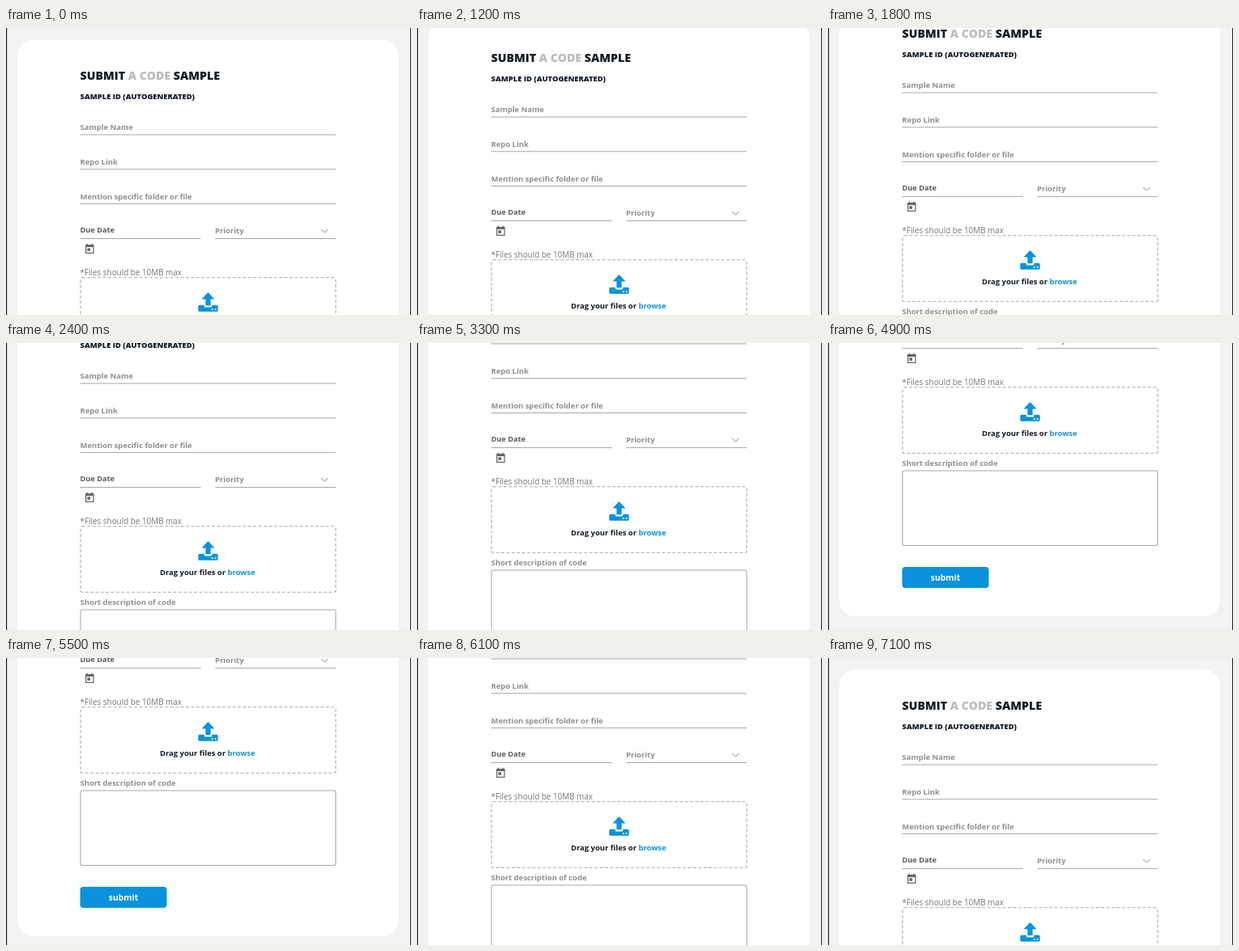
Recreate the animation shown at these times as an HTML page. Size 500x355 px, loop 7.2 s.

```html
<!DOCTYPE html>
<html lang="en">
<head>
<meta charset="utf-8">
<title>Submit a code sample</title>
<style>
  html, body { margin: 0; width: 100%; height: 100%; overflow: hidden; }
  svg { display: block; width: 500px; height: 355px; background: #f2f4f3; }
  text { font-family: "Open Sans", "Noto Sans", sans-serif; font-size: 9.45px; font-weight: 700; fill: #8f8f8f; }
  .title { font-size: 14.2px; font-weight: 800; fill: #131b24; }
  .dim { fill: #bcbcbc; }
  .sub { font-size: 9.4px; font-weight: 800; fill: #131b24; }
  .due { font-size: 9.2px; fill: #5c5c5c; }
  .note { font-size: 9.9px; font-weight: 400; fill: #777; }
  .drag { fill: #131b24; }
  .link { fill: #0b92dc; }
  .button { font-size: 10.4px; fill: #fff; }
  .line { fill: none; stroke: #a8a8a8; stroke-width: 1.05; }
  .blue { fill: #0b92dc; }
</style>
</head>
<body>
<svg viewBox="0 0 500 355">
  <g id="page">
    <rect x="14" y="14.5" width="470.3" height="577.5" rx="20" fill="#fff"/>

    <text class="title" x="91.5" y="63.5">SUBMIT <tspan class="dim">A CODE</tspan> SAMPLE</text>
    <text class="sub" x="91.5" y="88">SAMPLE ID (AUTOGENERATED)</text>

    <text x="91.5" y="126">Sample Name</text>
    <text x="91.5" y="168.7">Repo Link</text>
    <text x="91.5" y="211.5">Mention specific folder or file</text>
    <path class="line" d="M91.5 132H407M91.5 174.8H407M91.5 217.5H407"/>

    <text class="due" x="91.5" y="253.3">Due Date</text>
    <text x="258" y="254.3">Priority</text>
    <path class="line" d="M91.5 260.5H240.5M258.5 260.5H407M389 248.8l4.3 4.3 4.3-4.3"/>

    <g fill="#666">
      <path fill-rule="evenodd" d="M98 268h1.7v-1.2h1.5v1.2h4.2v-1.2h1.5v1.2h1.7v11h-10.6zM99.2 271v6.8h8.2v-6.8z"/>
      <rect x="100.4" y="272.3" width="3.6" height="3.6"/>
    </g>

    <text class="note" x="91.5" y="305.8">*Files should be 10MB max</text>
    <rect class="line" x="92" y="308.8" width="315" height="81.5" rx="2" stroke-dasharray="4 2.4"/>

    <path class="blue" d="M249.5 327l8 8.4h-4.9v7.9h-6.2v-7.9h-4.9z"/>
    <path class="blue" d="M238.8 342.7h6v1.6q0 1.2 1.2 1.2h7q1.2 0 1.2-1.2v-1.6h6q1.5 0 1.5 1.5v5q0 1.5-1.5 1.5h-21.4q-1.5 0-1.5-1.5v-5q0-1.5 1.5-1.5z"/>
    <circle cx="254.7" cy="348" r="1.1" fill="#fff"/>
    <circle cx="258.6" cy="348" r="1.1" fill="#fff"/>

    <text class="drag" x="190" y="368.8">Drag your files or <tspan class="link">browse</tspan></text>

    <text x="91.5" y="405.7">Short description of code</text>
    <rect class="line" x="92" y="412" width="315" height="92.5" rx="2"/>

    <rect class="blue" x="91.5" y="531" width="107" height="26" rx="4"/>
    <text class="button" x="145" y="547.8" text-anchor="middle">submit</text>
  </g>
  <rect width="1.2" height="355" fill="#222"/>
  <rect x="499" width="1" height="355" fill="#222"/>
</svg>
<script>
  const LOOP = 7200, STEP = 100;
  // [time in ms, scroll offset in px]
  const stops = [
    [0, 0], [1000, 0], [1200, 22], [2400, 82], [2600, 91], [3300, 131],
    [4200, 205], [4900, 254], [5300, 268], [5400, 268], [6100, 131], [7000, 0], [LOOP, 0]
  ];
  const page = document.getElementById("page");

  function scrollAt(t) {
    const i = stops.findIndex(s => s[0] > t);
    const [t0, y0] = stops[i - 1], [t1, y1] = stops[i];
    return Math.round(y0 + (y1 - y0) * (t - t0) / (t1 - t0));
  }

  function draw() {
    const t = Math.floor(performance.now() % LOOP / STEP) * STEP;
    page.setAttribute("transform", `translate(0 ${-scrollAt(t)})`);
    requestAnimationFrame(draw);
  }
  draw();
</script>
</body>
</html>
```
